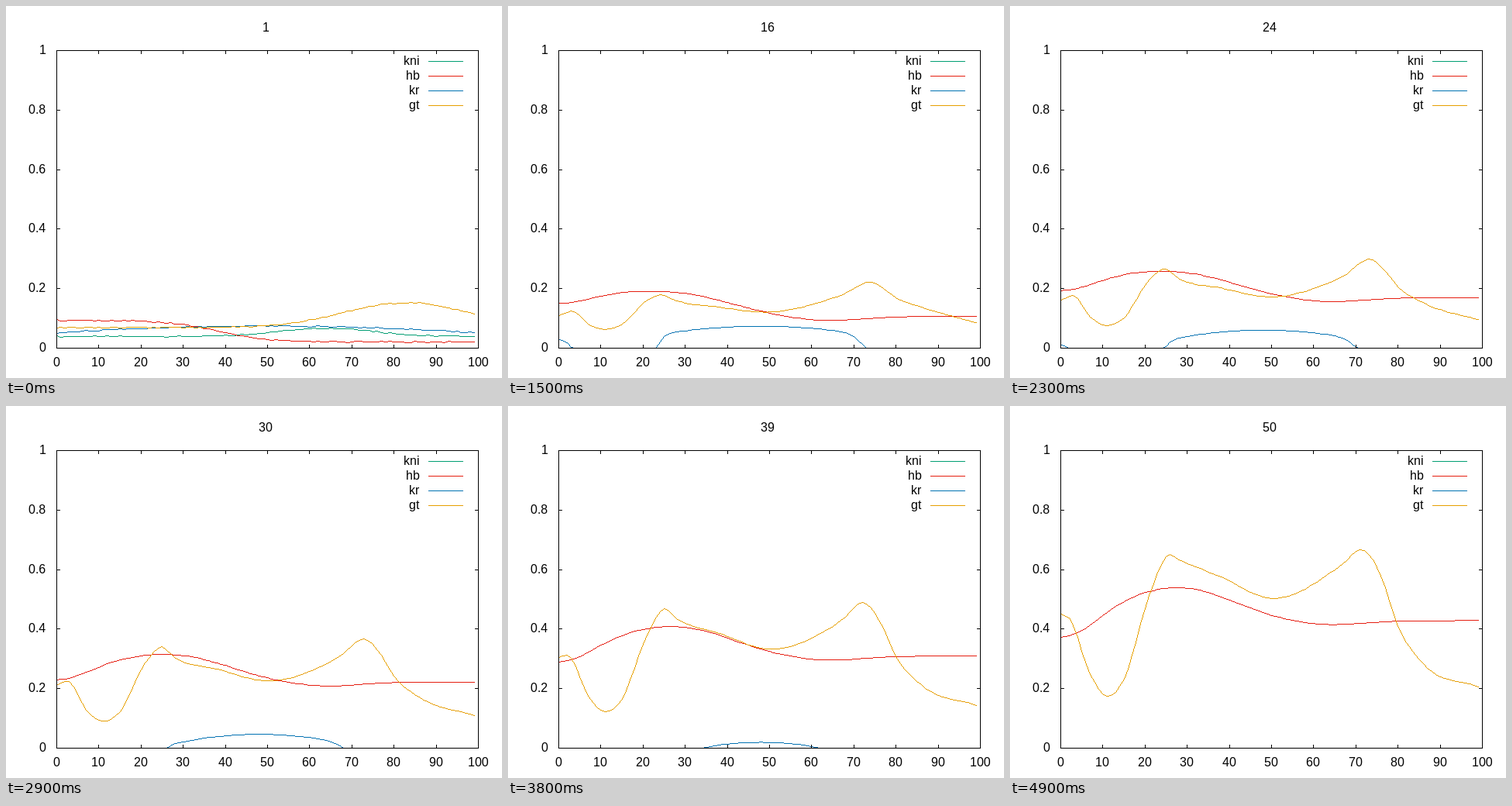
Recreate the animation shown at these times as an HTML page. Size 640x480 px, loop 5000 ms.

```html
<!DOCTYPE html>
<html lang="en">
<head>
<meta charset="utf-8">
<title>Gene levels</title>
<style>
html, body { margin: 0; width: 100%; height: 100%; overflow: hidden; background: #fff; }
svg { display: block; }
path { fill: none; stroke: #000; stroke-width: 1; shape-rendering: crispEdges; }
text { font: 16px "Liberation Sans", Arial, sans-serif; fill: #000; }
</style>
</head>
<body>
<svg id="plot" width="640" height="480" viewBox="0 0 640 480"></svg>
<script>
const LEFT = 65, RIGHT = 609, TOP = 57, BOTTOM = 441;
const STEP_MS = 100, STEPS = 50;
const SETTLED = 8; // step at which the initial profiles have faded out
const plot = document.getElementById('plot');

const bell = (x, mid, width) => Math.exp(-(((x - mid) / width) ** 2));
const sigmoid = v => 1 / (1 + Math.exp(-v));
const mix = (a, b, u) => a + (b - a) * u;
const growth = (u, linear) => u * (linear + (1 - linear) * u);

// Key points of gt: x, height when settled, final height, linear share of growth, drift in x
const gtKeys = [
  [0, 29, 173, 0.35],
  [4, 32, 168, 0.49, -2],
  [7, 26, 95, 0.25],
  [11, 22.5, 67, 0],
  [15, 26, 89, 0.26],
  [21, 39, 197, 0.7],
  [24, 41.5, 249.5, 0.62, 1.5],
  [28, 41, 243, 0.41],
  [38, 37.5, 221, 0.31],
  [50, 36, 193, 0.2],
  [67, 53, 238, 0.3],
  [75.5, 62, 256, 0.52, -4],
  [78, 59, 222, 0.4, -2],
  [80, 56, 157, 0.35],
  [86, 52, 109, -0.13],
  [99, 34, 79.5, -0.38]
];

// Heights are in pixels; u runs from 0 when settled to 1 at the last step,
// m counts the steps since then.
const genes = [
  { name: 'kni', color: '#009e73',
    first: x => 15 + 11 * bell(x, 64, 16),
    later: (u, m) => x => 12 * bell(x, 63.5, 8) - 1.5 * m },
  { name: 'hb', color: '#e51e10',
    first: x => 8 + 28 * sigmoid((38 - x) / 6),
    later: u => x => 19.5 + 33.5 * sigmoid((40 - x) / 6.5)
      - 10 * bell(x, 0, 10) - 6 * bell(x, 63, 12)
      + growth(u, 0.72) * (145 - 45 * bell(x, 0, 13) + 14.5 * bell(x, 31, 15)) },
  { name: 'kr', color: '#0072b2',
    first: x => 28.5 - 0.0035 * (x - 50) ** 2,
    later: (u, m) => x => {
      const head = 19 - 0.95 * m - 1.2 * x * x;
      const dome = 31 - 0.2 * m - 0.018 * m * m - (0.012 + 0.0008 * m) * (x - 48) ** 2;
      const cliffs = sigmoid((22.6 + 0.1 * m - x) / 0.8) + sigmoid((x - 73.8 + 0.18 * m) / 1.4);
      return Math.max(head, dome - 30 * cliffs);
    } },
  { name: 'gt', color: '#e69f00',
    first: x => 26.5 + 32 * bell(x, 83, 21),
    later: u => spline(gtKeys.map(([x, from, to, linear, drift = 0]) =>
      [x + drift * u, mix(from, to, growth(u, linear))])) }
];

// Smooth function through unevenly spaced points
function spline(points) {
  const last = points.length - 1;
  const slope = j => (points[j + 1][1] - points[j][1]) / (points[j + 1][0] - points[j][0]);
  const tangents = points.map(([x], j) => {
    if (j === 0) return slope(0);
    if (j === last) return slope(last - 1);
    const a = x - points[j - 1][0], b = points[j + 1][0] - x;
    return (slope(j - 1) * b + slope(j) * a) / (a + b);
  });
  return x => {
    let i = 0;
    while (i < last - 1 && x >= points[i + 1][0]) i++;
    const [x0, y0] = points[i], [x1, y1] = points[i + 1];
    const h = x1 - x0, u = (x - x0) / h, v = 1 - u;
    return v * v * (1 + 2 * u) * y0 + u * u * (3 - 2 * u) * y1
      + h * u * v * (v * tangents[i] - u * tangents[i + 1]);
  };
}

function jitter(seed) {
  const s = Math.sin(seed * 12.9898) * 43758.5453;
  return (s - Math.floor(s)) * 2 - 1;
}

// Hard-edged line, one pixel at a time
function pixelPath(points) {
  let d = '';
  for (let i = 1; i < points.length; i++) {
    const [x0, y0] = points[i - 1], dx = points[i][0] - x0, dy = points[i][1] - y0;
    const n = Math.max(Math.abs(dx), Math.abs(dy));
    for (let k = 0; k <= n; k++) {
      d += `M${x0 + Math.round(dx * k / n)} ${y0 + Math.round(dy * k / n) + 0.5}h1`;
    }
  }
  return d;
}

function curve(gene, id, step) {
  const m = step - SETTLED;
  const later = gene.later(m / (STEPS - SETTLED), m);
  const settled = Math.min(1, (step - 1) / (SETTLED - 1));
  const noise = 0.7 * Math.exp((1 - step) / 2);
  const points = [];
  for (let x = 0; x < 100; x++) {
    const h = mix(gene.first(x), later(x), settled) + noise * jitter(x + 100 * id + 1);
    points.push([Math.round(LEFT + 5.44 * x), Math.round(BOTTOM - Math.max(0, h))]);
  }
  return pixelPath(points);
}

function add(tag, attrs) {
  const el = document.createElementNS('http://www.w3.org/2000/svg', tag);
  for (const k in attrs) el.setAttribute(k, attrs[k]);
  return plot.appendChild(el);
}

// Text starts on a whole pixel; align is 0.5 for centred, 1 for right-aligned
function write(el, content, x, align) {
  el.textContent = content;
  el.setAttribute('x', Math.round(x - align * el.getComputedTextLength()));
}

for (const gene of genes) gene.path = add('path', { style: `stroke:${gene.color}` });

let axes = `M${LEFT + 0.5} ${TOP + 0.5}H${RIGHT + 0.5}V${BOTTOM + 0.5}H${LEFT + 0.5}Z`;
for (let i = 0; i <= 10; i++) {
  const x = Math.round(LEFT + 54.4 * i);
  axes += `M${x + 0.5} ${TOP}v5M${x + 0.5} ${BOTTOM + 1}v-5`;
  write(add('text', { y: 465 }), i * 10, x, 0.5);
}
for (let i = 0; i <= 5; i++) {
  const y = Math.round(BOTTOM - 76.8 * i);
  axes += `M${LEFT} ${y + 0.5}h5M${RIGHT + 1} ${y + 0.5}h-5`;
  write(add('text', { y: y + 5 }), i / 5, 51.5, 1);
}
add('path', { d: axes });

genes.forEach((gene, i) => {
  const y = 71 + 19 * i;
  write(add('text', { y: y + 5 }), gene.name, 533.5, 1);
  add('path', { d: `M545 ${y + 0.5}H590`, style: `stroke:${gene.color}` });
});
const title = add('text', { y: 33 });

let shown = 0;
function draw(now) {
  const step = Math.floor(now / STEP_MS) % STEPS + 1;
  if (step !== shown) {
    shown = step;
    write(title, step, 335.2, 0.5);
    genes.forEach((gene, i) => gene.path.setAttribute('d', curve(gene, i, step)));
  }
  requestAnimationFrame(draw);
}
draw(0);
</script>
</body>
</html>
```
